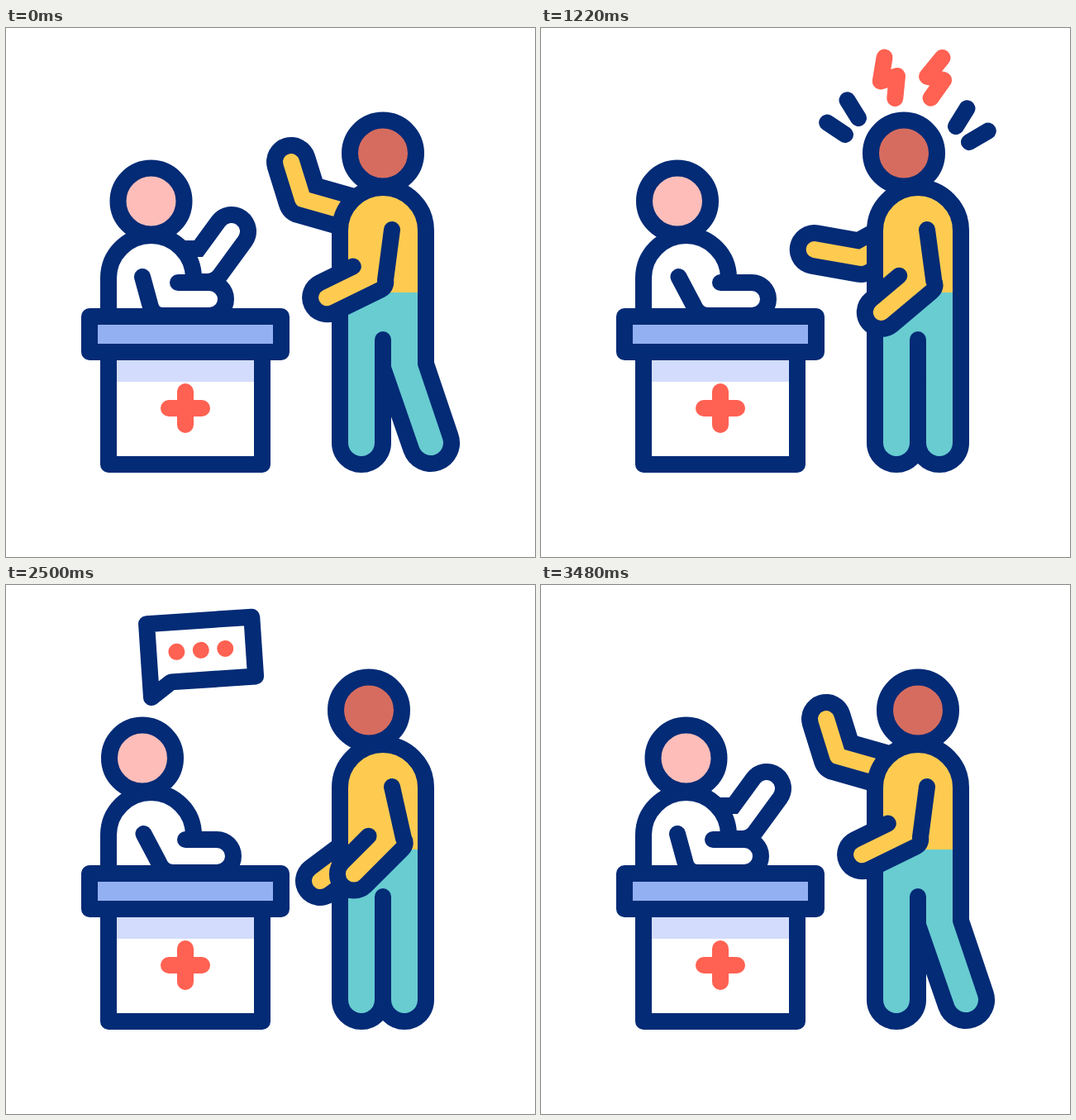
Write an HTML page that moves like this. It is 640 by 640 pixels and loops after 3.6 s.

```html
<!DOCTYPE html>
<html lang="en">
<head>
<meta charset="utf-8">
<title>Reception desk</title>
<style>
  html, body { margin: 0; width: 100%; height: 100%; overflow: hidden; background: #fff; }
  svg { display: block; width: 100vw; height: 100vh; }
  .ln { stroke: #032b76; stroke-width: 20; }
  .wide { stroke: #032b76; stroke-width: 60; }
  .thin { stroke-width: 20; }
  .red { stroke: #ff6152; stroke-width: 20; }
</style>
</head>
<body>
<svg viewBox="0 0 640 640" fill="none" stroke-linecap="round" stroke-linejoin="round">
  <defs>
    <linearGradient id="suit" gradientUnits="userSpaceOnUse" x1="0" y1="0" x2="0" y2="640">
      <stop offset=".5" stop-color="#fecb50"/>
      <stop offset=".5" stop-color="#68ccd1"/>
    </linearGradient>
  </defs>

  <!-- receptionist -->
  <g id="wave">
    <path class="wide" d="M215 287H243L273 246"/>
    <path class="thin" stroke="#fff" d="M215 287H243L273 246"/>
  </g>
  <circle id="headA" class="ln" cy="209.5" r="40" fill="#febdb9"/>
  <path class="ln" fill="#fff" d="M124 349V302.5A51.5 51.5 0 0 1 227 302.5V306"/>
  <path fill="#fff" d="M134 302H217V349H134Z"/>
  <path id="armA" class="ln" fill="#fff"/>

  <!-- desk -->
  <path fill="#fff" d="M124 392H310V528H124Z"/>
  <path fill="#d3dcfd" d="M124 392H310V428H124Z"/>
  <path class="ln" d="M124 392V528H310V392"/>
  <path class="ln" fill="#93b0f2" d="M101 349H333V392H101Z"/>
  <path class="red" d="M197 460H237M217 440V480"/>

  <!-- patient -->
  <path id="backOut" class="wide"/>
  <path id="backIn" class="thin" stroke="#fecb50"/>
  <circle id="headB" class="ln" cy="151.5" r="40" fill="#d66c5f"/>
  <path id="body" class="ln" fill="url(#suit)"/>
  <path class="ln" d="M456 377V420"/>
  <path id="armB" class="ln" fill="#fecb50"/>

  <!-- anger -->
  <path id="marks" class="ln"/>
  <path id="boltL" class="red" pathLength="1" d="M415 36L411 65L431 58L429 85"/>
  <path id="boltR" class="red" pathLength="1" d="M485 36L467 59L487 63L472 85"/>

  <!-- speech -->
  <g id="talk">
    <path id="bubble" class="ln" pathLength="1" d="M176 95V47H303.5V119H201L176 136Z"/>
    <g id="dots" fill="#ff6152">
      <circle cx="210" cy="83" r="10"/><circle cx="239.5" cy="83" r="10"/><circle cx="269" cy="83" r="10"/>
    </g>
  </g>
</svg>
<script>
const LOOP = 3600;
const el = {};
document.querySelectorAll('svg [id]').forEach(n => el[n.id] = n);

const set = (n, attrs) => { for (const k in attrs) n.setAttribute(k, attrs[k]); };
const show = (n, on) => n.setAttribute('visibility', on ? 'visible' : 'hidden');
const lerp = (a, b, k) => a + (b - a) * k;
const mix = (p, q, k) => p.map((v, i) => lerp(v, q[i], k));
const ramp = (t, a, b) => Math.min(1, Math.max(0, (t - a) / (b - a)));
const ease = (t, a, b) => { const k = ramp(t, a, b); return k * k * (3 - 2 * k); };
const pulse = (t, low, period) => (1 - Math.cos((t - low) / period * 2 * Math.PI)) / 2;
const rad = d => d * Math.PI / 180;

// shoulder, elbow, hand
const RAISED = [440, 230, 359, 207, 345, 162];
const POINT = [440, 249, 387, 278, 330, 274];
const DOWN = [460, 260, 436, 316, 380, 358];

// inner end, outer end
const MARKS = [
  [368, 129, 347, 115], [384, 109, 371, 88],
  [502, 119, 515, 98], [518, 138, 540, 125]
];

function receptionist(k) {
  set(el.headA, { cx: lerp(175.5, 165, k) });
  const [ex, ey, qx, bx, hx] = mix([174, 334, 177, 190, 246], [185, 336, 190, 203, 255], k);
  set(el.armA, {
    d: `M${lerp(165, 166.5, k)} 301L${ex} ${ey}Q${qx} 348 ${bx} 348H${hx}a20 20 0 0 0 0 -40H${lerp(208, 217, k)}`
  });
  set(el.wave, { transform: `rotate(${110 * k} 222 287)` });
  show(el.wave, k < 1);
}

function bodyShape(k) {
  const step = 1 - k;
  const fx = 482 + 32 * step, r = 26 - step, a = rad(19.2 * step);
  const nx = r * Math.cos(a), ny = -r * Math.sin(a);
  set(el.body, {
    d: `M404 245a52 52 0 0 1 104 0V406L${fx + nx} ${502 + ny}A${r} ${r} 0 0 1 ${fx - nx} ${502 - ny}` +
       `L456 411V502A26 26 0 0 1 404 502Z`
  });
  set(el.headB, { cx: lerp(456, 439, k) });
}

function frontArm(u) {
  const a = rad(lerp(26, 45, u));
  const dx = Math.cos(a), dy = -Math.sin(a);
  const ex = lerp(459, 481, u), ey = lerp(305, 306.5, u);
  // along the forearm, then across it, from the hand
  const hx = ex - 73 * dx + 12 * dy, hy = ey - 73 * dy - 12 * dx;
  const at = (s, n) => `${hx + s * dx + n * dy} ${hy + s * dy - n * dx}`;
  set(el.armB, {
    d: `M${at(45, 20)}L${at(0, 20)}A20 20 0 0 0 ${at(0, -20)}L${at(62, -20)}Q${at(71, -20)} ${ex} ${ey}L467 244`
  });
}

function backArm(t, k) {
  let p;
  if (t < 1900) {
    p = mix(RAISED, POINT, k);
    const a = rad(7.5 * k * pulse(t, 680, 400));
    const x = p[4] - p[2], y = p[5] - p[3];
    p[4] = p[2] + x * Math.cos(a) - y * Math.sin(a);
    p[5] = p[3] + x * Math.sin(a) + y * Math.cos(a);
  } else if (t < 2800) p = mix(POINT, DOWN, ease(t, 1900, 2240));
  else p = mix(RAISED, DOWN, k);
  const d = `M${p[0]} ${p[1]}L${p[2]} ${p[3]}L${p[4]} ${p[5]}`;
  set(el.backOut, { d });
  set(el.backIn, { d });
}

function anger(t) {
  const beat = pulse(t, 650, 500);
  const g = ease(t, 140, 340) * (1 - ease(t, 1640, 1840));
  show(el.marks, g > 0);
  set(el.marks, {
    d: MARKS.map(([x, y, X, Y]) => {
      const len = Math.hypot(X - x, Y - y), s = g * (len + 5 * beat) / len;
      return `M${x} ${y}L${lerp(x, X, s)} ${lerp(y, Y, s)}`;
    }).join('')
  });
  const b = ease(t, 140, 380) * (1 - ease(t, 1800, 2080));
  for (const [n, turn, pivot] of [[el.boltL, 8, '431 57'], [el.boltR, 6, '487 64']]) {
    show(n, b > 0);
    set(n, { 'stroke-dasharray': `${b} 2`, transform: `rotate(${turn * beat} ${pivot})` });
  }
}

function speech(t) {
  const k = ease(t, 1640, 1840) * (1 - ease(t, 2990, 3260));
  show(el.talk, k > 0);
  const tilt = t < 1880 ? lerp(-10, -5.5, ramp(t, 1680, 1880))
    : t < 2090 ? lerp(-5.5, -4.7, ramp(t, 1880, 2090))
    : -4.7 * pulse(t, 2270, 360);
  set(el.talk, { transform: `rotate(${tilt} 176 136)` });
  set(el.bubble, { 'stroke-dasharray': k < 1 ? `0 ${(1 - k) / 2} ${k} 2` : 'none' });
  set(el.dots, { opacity: ramp(t, 2100, 2300) * (1 - ramp(t, 2800, 3000)) });
}

function draw(t) {
  const back = ease(t, 3130, 3470);
  const k = ease(t, 20, 400) * (1 - back);
  receptionist(k);
  bodyShape(k);
  frontArm((0.46 * ease(t, 20, 500) + 0.54 * ramp(t, 500, 1880)) * (1 - back));
  backArm(t, k);
  anger(t);
  speech(t);
}

const start = performance.now();
function tick(now) {
  draw(Math.max(0, now - start) % LOOP);
  requestAnimationFrame(tick);
}
draw(0);
requestAnimationFrame(tick);
</script>
</body>
</html>
```
